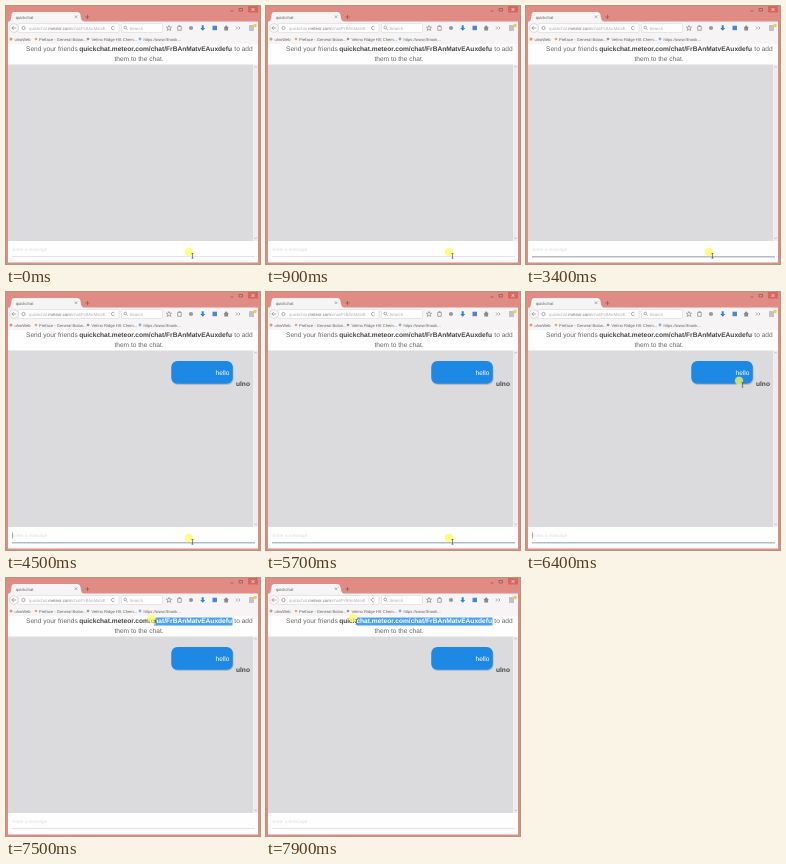
An HTML page for the animation above (8000 ms loop, 254 by 258 pixels).

```html
<!DOCTYPE html>
<html lang="en">
<head>
<meta charset="utf-8">
<title>quickchat</title>
<style>
  html, body { margin: 0; width: 100%; height: 100%; overflow: hidden; background: #e08b84; }
  svg { display: block; width: 100vw; height: 100vh; }
  text { font-family: "Liberation Sans", Arial, sans-serif; text-rendering: geometricPrecision; white-space: pre; }
  .small { font-size: 4.2px; fill: #666; }
  .address { font-size: 4.3px; fill: #b4b2b2; }
  .bookmarks { font-size: 4.1px; fill: #666; }
  .head { font-size: 6.6px; fill: #666; }
  .link { font-size: 6.6px; font-weight: bold; }
  .entry { font-size: 4.6px; }
  .icon { fill: none; stroke: #8a8888; stroke-width: .7; }

  .focus, .caret, .typed, .hint, .message, .typing { animation: 8s step-end infinite; }
  .focus { animation-name: focus; }
  .caret { animation-name: blink; }
  .typing { animation-name: typing; }
  .typed { animation-name: typed; }
  .hint { animation-name: hint; }
  .message { animation-name: message; }
  .mouse { animation: mouse 8s ease-in-out infinite; }
  .drag { animation: drag 8s ease-in-out infinite; }

  @keyframes focus { 0%, 85% { opacity: 0 } 23.75% { opacity: 1 } }
  @keyframes blink {
    0%, 30%, 42.5%, 62.5%, 81.25% { opacity: 0 }
    23.75%, 36.25%, 45%, 75% { opacity: 1 }
  }
  @keyframes typing {
    0%, 56.25% { transform: none }
    45% { transform: translateX(2.6px) }
    47.5% { transform: translateX(5.1px) }
    50% { transform: translateX(6.1px) }
    52.5% { transform: translateX(7.2px) }
    53.75% { transform: translateX(9.7px) }
  }
  @keyframes typed { 0%, 56.25% { opacity: 0 } 45% { opacity: 1 } }
  @keyframes hint { 0%, 56.25% { opacity: 1 } 45% { opacity: 0 } }
  @keyframes message { 0% { opacity: 0 } 56.25%, 100% { opacity: 1 } }
  @keyframes mouse {
    0%, 75% { transform: none }
    82.5%, 89.4% { transform: translate(39px, -204px) }
    97.5%, 100% { transform: translate(-96px, -206px) }
  }
  @keyframes drag {
    0%, 89.4% { transform: none }
    97.5%, 100% { transform: translateX(-136px) }
  }
</style>
</head>
<body>
<svg viewBox="0 0 254 258" preserveAspectRatio="none">
  <defs>
    <clipPath id="selection"><rect class="drag" x="227" y="38" width="140" height="12"/></clipPath>
  </defs>

  <!-- window frame and tab -->
  <rect width="254" height="258" fill="#e08b84"/>
  <rect x="242" width="10" height="6.500" fill="#d56660"/>
  <path d="M224.500 5h3M233 2.500h3.500v2.500h-3.500z" fill="none" stroke="#8d5550" stroke-width=".7"/>
  <path d="M245.500 2l3 3m0-3l-3 3" stroke="#f3dcda" stroke-width=".8"/>
  <path d="M3 16Q5 15 5.500 9Q6 6 8 6H71Q74 6 74.500 9Q75 15 78 16Z" fill="#f6f4f4"/>
  <text class="small" x="9.700" y="12.500">quickchat</text>
  <path class="icon" d="M68.800 9.500l2.400 2.400m0-2.400l-2.400 2.400"/>
  <path d="M79.500 11h4M81.500 9v4" stroke="#8d5c59" stroke-width=".8"/>

  <!-- toolbar -->
  <rect x="2" y="15.500" width="250" height="22.500" fill="#f6f4f4"/>
  <rect x="12" y="17.500" width="101" height="9" rx="1" fill="#fdfdfd" stroke="#dad8d8" stroke-width=".6"/>
  <circle cx="8" cy="22" r="4.300" fill="#fafafa" stroke="#c9c6c6" stroke-width=".6"/>
  <path class="icon" d="M10.200 22H5.800m2-2l-2 2l2 2"/>
  <circle class="icon" cx="17.500" cy="22" r="1.600"/>
  <text class="address" x="23" y="23.500">quickchat.<tspan fill="#777">meteor.com</tspan>/chat/FrBAnMatvE</text>
  <path class="icon" d="M108.500 21a1.700 1.700 0 1 0 0 2"/>
  <rect x="115.500" y="17.500" width="41" height="9" rx="1" fill="#fdfdfd" stroke="#dad8d8" stroke-width=".6"/>
  <circle class="icon" cx="119.300" cy="21.500" r="1.300"/>
  <path class="icon" d="M120.300 22.500l1.300 1.300"/>
  <text class="address" x="123.500" y="23.500" fill="#999">Search</text>
  <path class="icon" d="M163 19.500l.8 1.700h1.800l-1.400 1.200l.6 2L163 23.400l-1.800 1l.6-2l-1.400-1.200h1.800zM171.700 20.500h3.600v3.800h-3.600zM172.500 19.500h2"/>
  <circle cx="185" cy="22" r="2.100" fill="#999"/>
  <path d="M195.700 19.300h2V22h1.500l-2.500 2.700l-2.500-2.700h1.500z" fill="#2d83d6"/>
  <rect x="206.500" y="19.700" width="4.500" height="4.500" fill="#4f86c6"/>
  <path d="M217.500 22l2.700-2.700l2.700 2.700h-.8v2.500h-3.800V22z" fill="#8b8988"/>
  <path class="icon" d="M230 20.500l1.500 1.500l-1.500 1.500m2.500-3l1.500 1.500l-1.500 1.500"/>
  <path d="M243 20h5M243 22h5M243 24h5" stroke="#777" stroke-width=".8"/>
  <circle cx="249" cy="19.500" r="1.800" fill="#f0cc55"/>

  <!-- bookmarks -->
  <circle cx="5" cy="33" r="1.500" fill="#dd9a68"/>
  <circle cx="30" cy="33" r="1.300" fill="#d9ab7b"/>
  <circle cx="82" cy="33" r="1.300" fill="#999"/>
  <circle cx="134" cy="33" r="1.400" fill="#8aaed4"/>
  <g class="bookmarks">
    <text x="8.500" y="34.500">ulnoWeb</text>
    <text x="33" y="34.500">Preface - General Botan...</text>
    <text x="85.500" y="34.500">Velmo Ridge HS Chem...</text>
    <text x="137.500" y="34.500">https://www.filnook...</text>
  </g>

  <!-- page -->
  <rect x="2" y="38" width="250" height="218.500" fill="#fefefe"/>
  <rect x="2" y="58.500" width="245" height="176.500" fill="#dbdadd"/>
  <rect x="247" y="58.500" width="5" height="176.500" fill="#efeeef"/>
  <path d="M248.500 61.500l1.200-1.500l1.200 1.500M248.500 231.500l1.200 1.500l1.200-1.500" fill="none" stroke="#aaa" stroke-width=".6"/>
  <text class="head" x="20" y="45.300">Send your friends </text>
  <g fill="#444"><text id="link" class="link" x="73.200" y="45.300">quickchat.meteor.com/chat/FrBAnMatvEAuxdefu</text></g>
  <text class="head" x="228.300" y="45.300">to add</text>
  <text class="head" x="133" y="55" text-anchor="middle">them to the chat.</text>
  <g clip-path="url(#selection)">
    <rect x="90.500" y="39.500" width="136" height="8" fill="#4a9ff0"/>
    <use href="#link" fill="#fff"/>
  </g>

  <g class="message">
    <rect x="165.500" y="70" width="62" height="22.800" rx="6" fill="#a9b4c2"/>
    <rect x="165.300" y="69" width="61.500" height="22.800" rx="6" fill="#1e88e5"/>
    <text x="223.500" y="82.800" text-anchor="end" font-size="6.600" fill="#fff">hello</text>
    <text x="230" y="93.500" font-size="6.600" font-weight="bold" fill="#444">ulno</text>
  </g>

  <!-- message field -->
  <text class="entry hint" x="6.500" y="245.200" fill="#dedede">Enter a message</text>
  <g class="typed">
    <text class="entry" x="6.500" y="245.200" fill="#555">hello</text>
    <rect class="typing" x="6.500" y="239" width="12" height="8" fill="#fefefe"/>
  </g>
  <g class="typing"><path class="caret" d="M6.500 240.500v6" stroke="#888" stroke-width=".7"/></g>
  <path d="M6 250.500H249" stroke="#dcdcdc" stroke-width=".8"/>
  <path class="focus" d="M6 250.700H249" stroke="#b3bdc1" stroke-width="1.500"/>

  <g class="mouse">
    <circle cx="183" cy="246" r="4.200" fill="#fff95c" opacity=".75"/>
    <path d="M185.500 247.500h2m-1 0v4.700m-1 0h2" fill="none" stroke="#555" stroke-width=".7"/>
  </g>
</svg>
</body>
</html>
```
